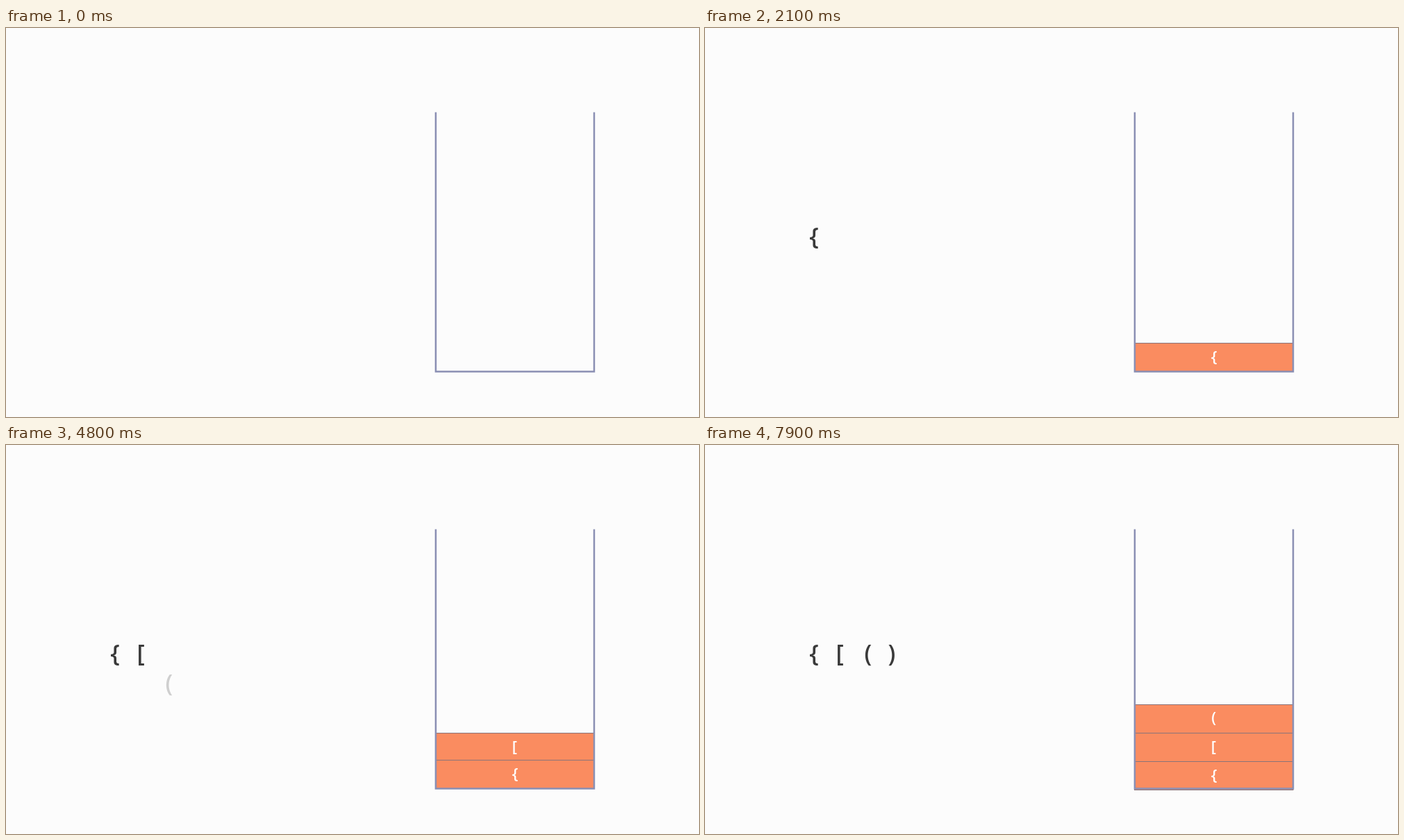
Recreate the animation shown at these times as an HTML page with a canvas. Size 998 by 561 pixels, loop 8000 ms.

```html
<!DOCTYPE html>
<html lang="en">
<head>
<meta charset="utf-8">
<title>Bracket stack</title>
<style>
html, body { margin: 0; width: 100%; height: 100%; overflow: hidden; background: #fcfcfc; }
canvas { display: block; }
</style>
</head>
<body>
<canvas id="stage" width="998" height="561"></canvas>
<script>
const ctx = document.getElementById('stage').getContext('2d');
const LOOP = 8000, STEP = 100;
const RISE = 56, RISE_MS = 350;
const BOX = { x: 618.5, w: 228.5, h: 41 };

// x is the middle of the ink; start is when the sign begins to rise
const signs = [
  { ch: '{', x: 156.8, start: 842 },
  { ch: '[', x: 194.9, start: 2530 },
  { ch: '(', x: 235, start: 4758 },
  { ch: ')', x: 269, start: 7263 }
];

// Boxes drop in from above the stage; rest is the final top edge
const boxes = [
  { ch: '(', rest: 374.5, start: 6328, ms: 625 },
  { ch: '[', rest: 415.5, start: 3148, ms: 535 },
  { ch: '{', rest: 454.5, start: 1564, ms: 543, sinkAt: 7000, sink: 2 }
];

const easeOut = u => 1 - (1 - u) ** 2;

function progress(t, start, ms) {
  return easeOut(Math.min(1, Math.max(0, (t - start) / ms)));
}

// Centres the ink of a sign on a point
function glyph(ch, x, y, size, color) {
  ctx.font = `600 ${size}px "Open Sans", "Noto Sans", sans-serif`;
  ctx.fillStyle = color;
  const m = ctx.measureText(ch);
  ctx.fillText(ch,
    x + (m.actualBoundingBoxLeft - m.actualBoundingBoxRight) / 2,
    y + (m.actualBoundingBoxAscent - m.actualBoundingBoxDescent) / 2);
}

function drawBox(box, t) {
  if (t < box.start) return;
  let y = -BOX.h + (box.rest + BOX.h) * progress(t, box.start, box.ms);
  if (t >= box.sinkAt) y += box.sink;
  y = Math.round(y - 0.5) + 0.5;
  ctx.fillStyle = '#fa8c60';
  ctx.fillRect(BOX.x, y, BOX.w, BOX.h);
  ctx.strokeStyle = '#8a7479';
  ctx.lineWidth = 1;
  ctx.strokeRect(BOX.x, y, BOX.w, BOX.h);
  glyph(box.ch, 732.8, y + BOX.h / 2, 22, '#fff');
}

function drawContainer() {
  ctx.strokeStyle = '#8a8fb3';
  ctx.lineWidth = 2.5;
  ctx.beginPath();
  ctx.moveTo(618.9, 121.5);
  ctx.lineTo(618.9, 495.6);
  ctx.lineTo(847, 495.6);
  ctx.lineTo(847, 121.5);
  ctx.stroke();
}

function draw(t) {
  ctx.fillStyle = '#fcfcfc';
  ctx.fillRect(0, 0, 998, 561);
  for (const s of signs) {
    const p = progress(t, s.start, RISE_MS);
    ctx.globalAlpha = p;
    if (p > 0) glyph(s.ch, s.x, 303 + RISE * (1 - p), 34, '#3a3a3a');
  }
  ctx.globalAlpha = 1;
  boxes.forEach(b => drawBox(b, t));
  drawContainer();
}

function tick() {
  const t = performance.now() % LOOP;
  draw(Math.floor(t / STEP) * STEP);
  requestAnimationFrame(tick);
}
tick();
</script>
</body>
</html>
```
